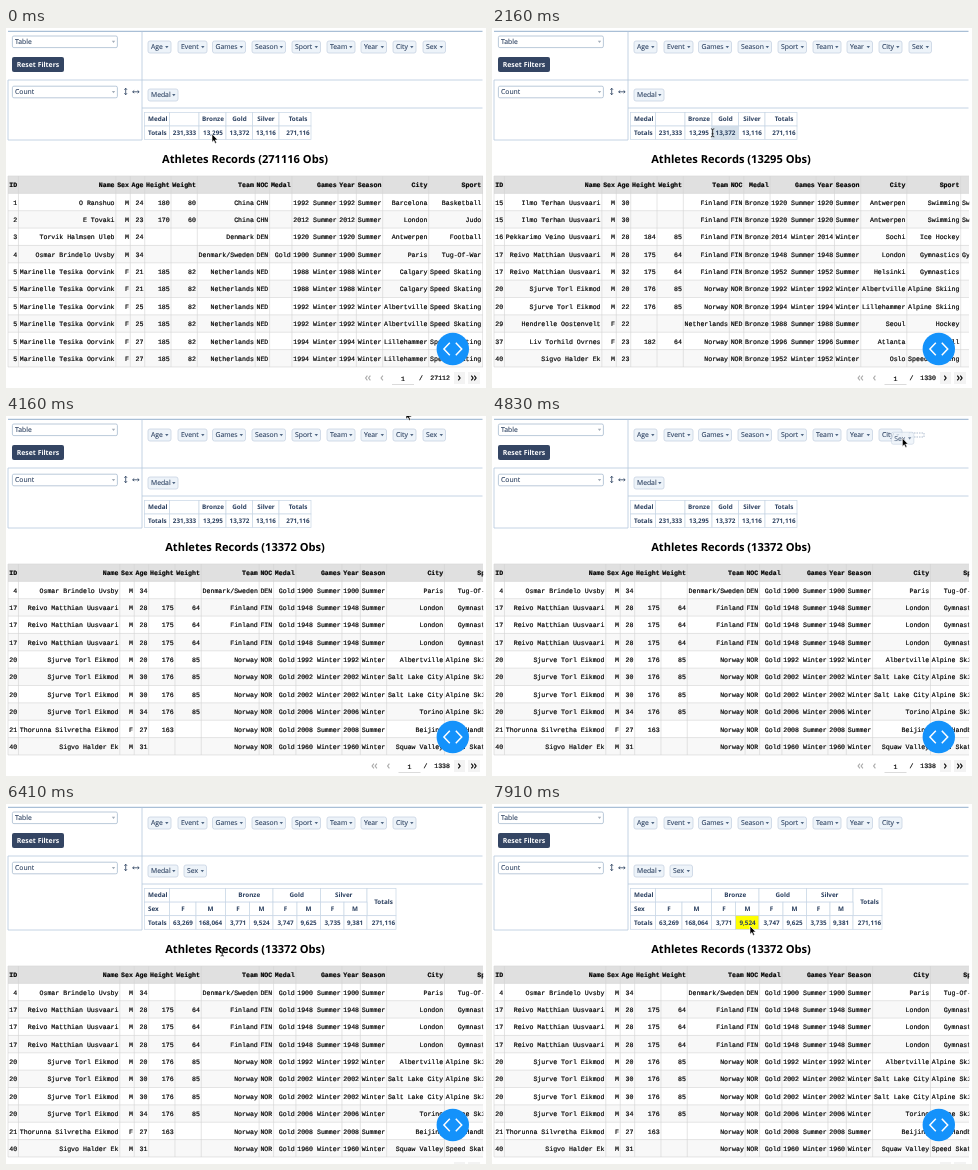
These frames come from a looping animation (480 px wide and 360 px high, 8000 ms). An HTML page:

```html
<!DOCTYPE html>
<html lang="en">
<head>
<meta charset="utf-8">
<title>Pivot table and records</title>
<style>
html, body { margin: 0; width: 100%; height: 100%; overflow: hidden; background: #fff; }
svg { display: block; width: 480px; height: 360px; }
text { font-family: "Open Sans", sans-serif; fill: #2a3f5f; text-rendering: geometricPrecision; white-space: pre; }
.ui { font-size: 6.8px; stroke: #2a3f5f; stroke-width: .1; }
.pivot { font-size: 6.3px; font-weight: 700; }
.mono { font: 6.58px "Liberation Mono", monospace; fill: #000; stroke: #000; stroke-width: .18; }
.head { font-weight: 700; }
.title { font-size: 11.1px; font-weight: 700; fill: #000; }
.line { fill: none; stroke: #b5c8de; stroke-width: .8; }
.top { fill: none; stroke: #a9bfd6; stroke-width: 1.3; }
.cell { stroke: #c8d6e6; stroke-width: .7; }
</style>
</head>
<body>
<svg id="stage" viewBox="0 0 480 360"></svg>
<script>
const LOOP = 8000, STEP = 250 / 3;
const CHAR = 6.58 * .6, PAD = 2.6, ROW = 17.36, TOP = 148;

const text = (x, cy, s, cls, size, anchor = 'middle', extra = '') =>
  `<text x="${x}" y="${cy + size * .355}" class="${cls}" text-anchor="${anchor}" ${extra}>${s}</text>`;
const rect = (x, y, w, h, extra) => `<rect x="${x}" y="${y}" width="${w}" height="${h}" ${extra}/>`;
const path = (d, extra) => `<path d="${d}" ${extra}/>`;
const group = (id, body, extra = '') => `<g id="${id}" ${extra}>${body}</g>`;
const caret = (x, y, color = '#506784') => path(`M${x - 1.7} ${y - 1}h3.4l-1.7 2.2z`, `fill="${color}"`);

// Records
const HEADS = 'ID,Name,Sex,Age,Height,Weight,Team,NOC,Medal,Games,Year,Season,City,Sport'.split(',');
const NOC = { China: 'CHN', Denmark: 'DEN', 'Denmark/Sweden': 'DEN', Netherlands: 'NED', Finland: 'FIN', Norway: 'NOR' };
const tug = '4|Osmar Brindelo Uvsby|M|34|||Denmark/Sweden|Gold|1900 Summer|Paris|Tug-Of-War';
const skater = rest => `5|Marinelle Tesika Oorvink|F|${rest}|Speed Skating`;
const calgary = skater('21|185|82|Netherlands||1988 Winter|Calgary');
const albert = skater('25|185|82|Netherlands||1992 Winter|Albertville');
const lille = skater('27|185|82|Netherlands||1994 Winter|Lillehammer');
const swimmer = '15|Ilmo Terhan Uusvaari|M|30|||Finland|Bronze|1920 Summer|Antwerpen|Swimming|Sw';
const gymnast = (age, medal, place) => `17|Reivo Matthian Uusvaari|M|${age}|175|64|Finland|${medal}|${place}|Gymnastics`;
const skier = (age, medal, place) => `20|Sjurve Torl Eikmod|M|${age}|176|85|Norway|${medal}|${place}|Alpine Skiing`;
const racer = (age, medal, place) => `40|Sigvo Halder Ek|M|${age}|||Norway|${medal}|${place}|Speed Skating`;
const goldGym = gymnast(28, 'Gold', '1948 Summer|London');
const saltLake = skier(30, 'Gold', '2002 Winter|Salt Lake City');

const PAGES = [
  { obs: 271116, pages: 27112, rows: [
    '1|O Ranshuo|M|24|180|80|China||1992 Summer|Barcelona|Basketball',
    '2|E Tovaki|M|23|170|60|China||2012 Summer|London|Judo',
    '3|Torvik Halmsen Uleb|M|24|||Denmark||1920 Summer|Antwerpen|Football',
    tug, calgary, calgary, albert, albert, lille, lille] },
  { obs: 13295, pages: 1330, rows: [
    swimmer, swimmer,
    '16|Pekkarimo Veino Uusvaari|M|28|184|85|Finland|Bronze|2014 Winter|Sochi|Ice Hockey',
    gymnast(28, 'Bronze', '1948 Summer|London') + '|Gy',
    gymnast(32, 'Bronze', '1952 Summer|Helsinki'),
    skier(20, 'Bronze', '1992 Winter|Albertville'),
    skier(22, 'Bronze', '1994 Winter|Lillehammer'),
    '29|Hendrelle Oostenvelt|F|22|||Netherlands|Bronze|1988 Summer|Seoul|Hockey',
    '37|Liv Torhild Ovrnes|F|23|182|64|Norway|Bronze|1996 Summer|Atlanta|Football',
    racer(23, 'Bronze', '1952 Winter|Oslo')] },
  { obs: 13372, pages: 1338, rows: [
    tug, goldGym, goldGym, goldGym,
    skier(20, 'Gold', '1992 Winter|Albertville'), saltLake, saltLake,
    skier(34, 'Gold', '2006 Winter|Torino'),
    '21|Thorunna Silvretha Eikmod|F|27|163||Norway|Gold|2008 Summer|Beijing|Handball',
    racer(31, 'Gold', '1960 Winter|Squaw Valley')] }
];

function expand(row) {
  const [id, name, sex, age, height, weight, team, medal, games, city, sport, event = ''] = row.split('|');
  return [id, name, sex, age, height, weight, team, NOC[team], medal, games, ...games.split(' '), city, sport, event];
}

function pager(pages) {
  const shift = pages > 9999 ? 0 : 6.5, y = 350;
  const chevrons = (x, dir, n, color) => Array.from({ length: n }, (_, i) =>
    path(`M${x + i * 3 - dir * .9} ${y - 2.3}l${1.8 * dir} 2.3l${-1.8 * dir} 2.3`, `fill="none" stroke="${color}" stroke-width="1.1"`)).join('');
  return rect(448, 344, 11, 12, 'fill="#f3f3f3"') + rect(462, 344, 12, 12, 'fill="#f3f3f3"') +
    chevrons(360.5 + shift, -1, 2, '#aaa') + chevrons(376 + shift, -1, 1, '#aaa') +
    text(397 + shift, y + 1, '1', 'mono', 6.58) +
    path(`M${386 + shift} 356.5h22`, 'stroke="#ccc" stroke-width=".7"') +
    text(415 + shift * .7, y, '/', 'mono', 6.58) + text(444, y, pages, 'mono', 6.58, 'end') +
    chevrons(453.2, 1, 1, '#000') + chevrons(466.2, 1, 2, '#000');
}

function records({ obs, pages, rows }, index) {
  const data = rows.map(expand);
  const bottom = TOP + ROW * 11;
  let out = '', stripes = rect(2, TOP, 475, ROW, 'fill="#e0e0e0"'), lines = `M2 ${TOP}V${bottom}`, x = 2;
  data.forEach((_, r) => { if (r % 2) stripes += rect(2, TOP + ROW * (r + 1), 475, ROW, 'fill="#f8f8f8"'); });
  for (let r = 0; r < 12; r++) lines += `M2 ${TOP + ROW * r}H477`;
  HEADS.forEach((head, c) => {
    x += Math.max(head.length, ...data.map(d => d[c].length)) * CHAR + PAD;
    lines += `M${x} ${TOP}V${bottom}`;
    out += text(x - 1.3, TOP + ROW / 2, head, 'mono head', 6.58, 'end');
    data.forEach((d, r) => { out += text(x - 1.3, TOP + ROW * (r + 1.5) + .3, d[c], 'mono', 6.58, 'end'); });
  });
  data.forEach((d, r) => { out += text(x + 1.3, TOP + ROW * (r + 1.5) + .3, d[14], 'mono', 6.58, 'start'); });
  return group('page' + index,
    text(239, 131, `Athletes Records (${obs} Obs)`, 'title', 11.1) +
    `<g clip-path="url(#view)">${stripes}${path(lines, 'fill="none" stroke="#d3d3d3" stroke-width=".6"')}${out}</g>` +
    pager(pages));
}

// Pivot tables
const box = (x1, y1, x2, y2, id = '') =>
  rect(x1, y1, x2 - x1, y2 - y1, `class="cell" fill="#fff" ${id && `id="${id}"`}`);
const label = (x, y, s) => text(x, y, s, 'pivot', 6.3);
const left = (y, s) => text(142, y, s, 'pivot', 6.3, 'start');

function simplePivot() {
  const edges = [163.5, 193, 220, 246.5, 273, 305], mids = [178.5, 207, 233.5, 260, 292];
  const heads = ['', 'Bronze', 'Gold', 'Silver', 'Totals'];
  const sums = ['231,333', '13,295', '13,372', '13,116', '271,116'];
  return group('simple', box(138.5, 84.5, 163.5, 98) + box(138.5, 98, 163.5, 111.5) +
    left(91, 'Medal') + left(104.8, 'Totals') +
    mids.map((m, i) => box(edges[i], 84.5, edges[i + 1], 98) + box(edges[i], 98, edges[i + 1], 111.5, 'sum' + i) +
      label(m, 91, heads[i]) + label(m, 104.8, sums[i])).join(''));
}

function splitPivot() {
  const edges = [163.5, 190, 219.5, 243.5, 267, 291, 314.5, 338, 361, 390];
  const mids = [177, 204.5, 232, 255.5, 279.5, 302.5, 326.5, 349, 377.5];
  const sums = '63,269 168,064 3,771 9,524 3,747 9,625 3,735 9,381 271,116'.split(' ');
  let out = ['Medal', 'Sex', 'Totals'].map((s, i) =>
    box(138.5, 84.5 + i * 13.6, 163.5, 98.1 + i * 13.6) + left(91 + i * 13.8, s)).join('');
  ['', 'Bronze', 'Gold', 'Silver'].forEach((s, i) => {
    out += box(edges[i * 2], 84.5, edges[i * 2 + 2], 98.1) + label((edges[i * 2] + edges[i * 2 + 2]) / 2, 91, s);
  });
  out += box(361, 84.5, 390, 111.7) + label(377.5, 98, 'Totals');
  mids.forEach((m, i) => {
    if (i < 8) out += box(edges[i], 98.1, edges[i + 1], 111.7) + label(m, 104.8, 'FM'[i % 2]);
    out += box(edges[i], 111.7, edges[i + 1], 125.3, 'split' + i) + label(m, 118.6, sums[i]);
  });
  return group('split', out);
}

// Controls
const chip = (x, y, w, s) => rect(x, y - 6, w, 12, 'rx="2" fill="#edf3f9" stroke="#c8d4e3" stroke-width=".8"') +
  text(x + 3, y, s, 'ui', 6.8, 'start') + caret(x + w - 4.2, y);
const select = (y, s) => rect(6.4, y - 5.8, 105, 11.6, 'rx="1.5" fill="#fff" stroke="#a9bbd0" stroke-width=".8"') +
  text(9, y, s, 'ui', 6.8, 'start') + caret(107.5, y, '#a3adb9');
const CHIPS = [['Age', 142, 23], ['Event', 172, 29], ['Games', 206.5, 33], ['Season', 246, 33.5],
  ['Sport', 286, 28.5], ['Team', 321, 28], ['Year', 355, 25.5], ['City', 387, 23]];
const arrows = 'M119.7 60.4V66.6M118.4 61.8l1.3-1.6 1.3 1.6M118.4 65.2l1.3 1.6 1.3-1.6' +
  'M126.8 63.8h6.2M128.2 62.5l-1.6 1.3 1.6 1.3M131.6 62.5l1.6 1.3-1.6 1.3';

const stage = document.getElementById('stage');
stage.innerHTML = '<defs><clipPath id="view"><rect width="477.2" height="360"/></clipPath></defs>' +
  path('M2 3.4H476.5', 'class="top"') +
  path('M2 52H476.5M136 80H476.5M136 3.5V112M2 52V112', 'class="line"') +
  path('M2 112H136', 'class="line" id="floor"') +
  select(13.8, 'Table') + select(64, 'Count') +
  rect(6, 29, 52, 15, 'rx="2" fill="#344563"') +
  text(32, 36.3, 'Reset Filters', '', 6.9, 'middle', 'style="font-size:6.9px;font-weight:700;fill:#fff"') +
  path(arrows, 'fill="none" stroke="#2a3f5f" stroke-width=".8"') +
  CHIPS.map(([s, x, w]) => chip(x, 19, w, s)).join('') + chip(142, 67, 30, 'Medal') +
  simplePivot() + splitPivot() + group('lower', PAGES.map(records).join('')) +
  group('slot', rect(0, 0, 15, 4, 'fill="none" stroke="#8fa3bb" stroke-width=".7" stroke-dasharray="1.5 1"')) +
  group('sex', chip(0, 0, 22.5, 'Sex')) +
  '<circle cx="446.8" cy="321" r="16.2" fill="#1492fb"/>' +
  path('M443.8 314.8l-5.9 6.2 5.9 6.2M449.8 314.8l5.9 6.2-5.9 6.2', 'fill="none" stroke="#fff" stroke-width="1.5"') +
  group('arrow', path('M0 0V8.2L1.9 6.5 3.2 9.4 4.6 8.8 3.3 5.9H5.8Z', 'fill="#000" stroke="#fff" stroke-width=".6"')) +
  group('beam', path('M-1.7-4Q0-4 0-3Q0-4 1.7-4M0-3V3M-1.7 4Q0 4 0 3Q0 4 1.7 4M-1 1h2', 'fill="none" stroke="#111" stroke-width=".8"'));

const el = id => document.getElementById(id);
const show = (id, on) => { el(id).style.display = on ? '' : 'none'; };
const move = (id, x, y) => el(id).setAttribute('transform', `translate(${x} ${y})`);

// Pointer stops: time, x, y
const POINTER = [[0, 206, 106], [600, 210, 104], [1950, 211, 104], [2450, 235, 106], [3550, 236, 106],
  [4100, 400, -5], [4200, 400, -5], [4500, 428, 16], [4700, 428, 18], [5500, 190, 75], [5830, 190, 75],
  [6330, 216, 148], [6580, 217, 148], [7080, 258, 122], [LOOP + STEP, 258, 122]];
const GRAB = 4700, DROP = 5830, BRONZE = 1900, GOLD = 3450;

function pointerAt(t) {
  const i = POINTER.findIndex(p => p[0] > t);
  const [t0, x0, y0] = POINTER[i - 1], [t1, x1, y1] = POINTER[i];
  const u = (t - t0) / (t1 - t0), k = u * u * (3 - 2 * u);
  return [x0 + (x1 - x0) * k, y0 + (y1 - y0) * k];
}

function fillCell(id, clicked, hovered) {
  el(id).setAttribute('fill', clicked ? '#ffff00' : hovered ? '#d5e0ea' : '#fff');
}

function draw(now) {
  const t = Math.floor((now % LOOP) / STEP + .1) * STEP;
  const [x, y] = pointerAt(t);
  const page = t < BRONZE ? 0 : t < GOLD ? 1 : 2;
  const dropped = t >= DROP, dragging = t >= GRAB && !dropped;
  PAGES.forEach((_, i) => show('page' + i, i === page));
  show('simple', !dropped);
  show('split', dropped);
  move('lower', 0, dropped ? 14 : 0);
  el('floor').setAttribute('d', dropped ? 'M2 126H136M2 112V126M136 112V126' : 'M2 112H136');

  fillCell('sum1', t >= 750 && t < BRONZE, t >= 400 && t < 2150);
  fillCell('sum2', t >= 3000 && t < GOLD, t >= 2150 && t < 3600);
  fillCell('split3', t >= 7330, t >= 6950);

  if (dragging) move('sex', x - 11, y);
  else move('sex', dropped ? 178 : 417, dropped ? 67 : 19);
  el('sex').style.opacity = dragging ? .8 : 1;
  show('slot', dragging);
  if (y > 50) move('slot', 175.5, 64.5); else move('slot', 417, 17);

  const beam = t >= 750 && t < 3600 || t >= 6150 && t < 6700;
  show('arrow', !beam);
  show('beam', beam);
  move('arrow', x, y);
  move('beam', x, y);
}

const start = performance.now();
function tick() {
  draw(performance.now() - start);
  requestAnimationFrame(tick);
}
tick();
</script>
</body>
</html>
```
